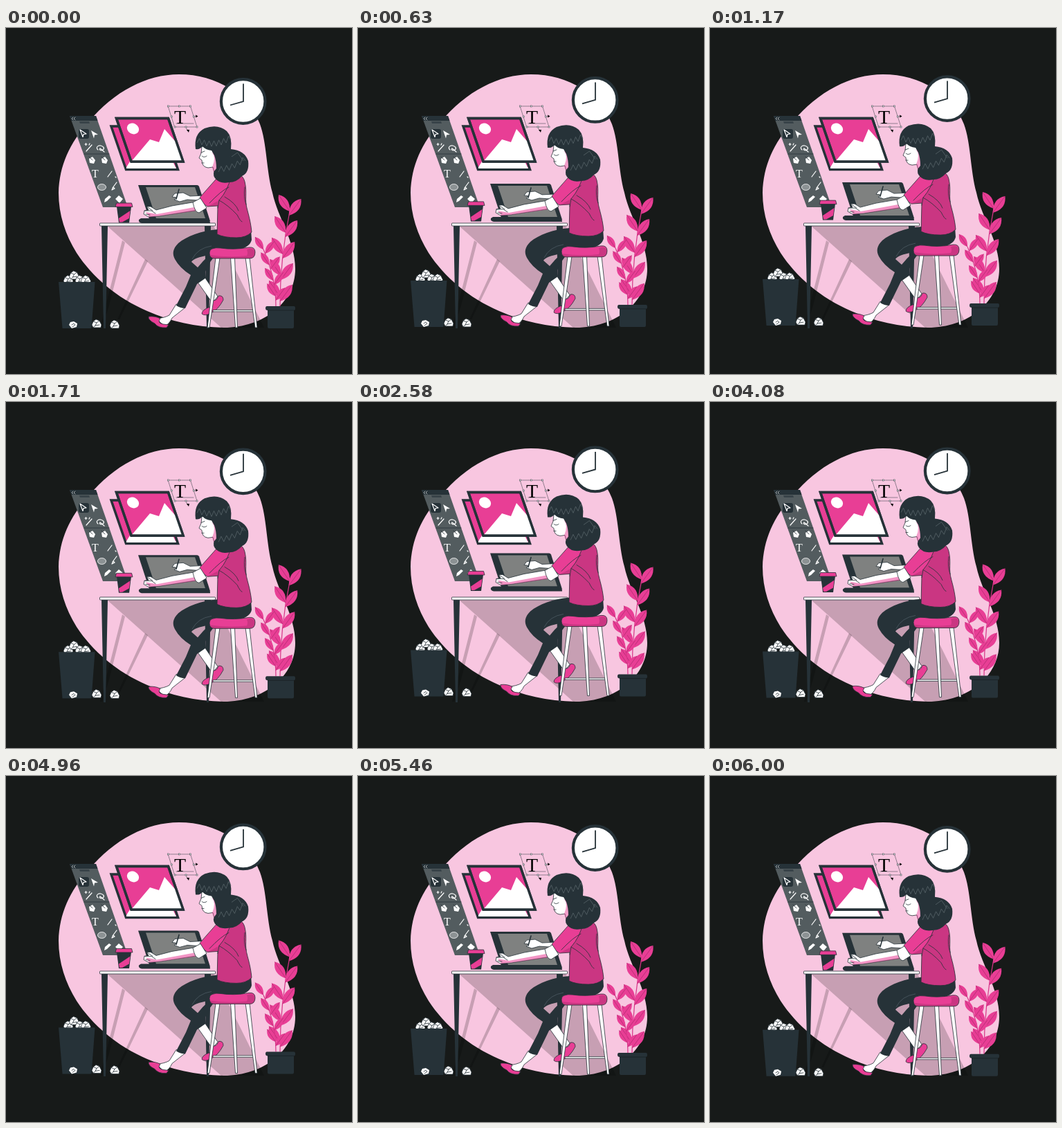
Write an HTML page that moves like this. It is 500 px wide and 500 px high and loops after 6040 ms.

```html
<!DOCTYPE html>
<html lang="en">
<head>
<meta charset="utf-8">
<title>Designer at work</title>
<style>
  html, body { margin: 0; width: 100%; height: 100%; overflow: hidden; background: #171a19; }
  svg { display: block; width: 100vw; height: 100vh; }
  .ink { fill: #263238; }
  .pink { fill: #e83e95; }
  .white { fill: #fff; }
  .line { fill: none; stroke: #263238; stroke-width: .8; stroke-linecap: round; stroke-linejoin: round; }
  .edge { stroke: #263238; stroke-width: .8; stroke-linejoin: round; }
  .icon { fill: none; stroke: #fff; stroke-width: 1.2; stroke-linecap: round; stroke-linejoin: round; }
  .wave { fill: none; stroke: #59656a; stroke-width: .8; stroke-linejoin: round; }
  .shade { fill: #000; opacity: .2; }
  .soft { opacity: .13; }
  text { font-family: "Liberation Serif", "Noto Serif", serif; }
</style>
</head>
<body>
<svg viewBox="0 0 500 500">
  <defs>
    <g id="paper">
      <path class="white edge" d="M-7 2L-5-3-1-6 4-4 7 2 6 6-5 6Z"/>
      <path class="line" d="M-5-3L0-1 4-4M0-1L-2 3-5 6M-2 3L4 2"/>
    </g>
    <g id="nib">
      <path class="white" d="M-4-2L1-5 5 0 3 5-3 4Z"/>
      <path class="line" d="M-4-5L1 0"/>
    </g>
    <path id="frame" d="M159.500 130.500H234.500L256 193H181Z"/>
  </defs>

  <path fill="#f8c6e0" d="M250 67C305 67 351 97 367 139C377 166 376 205 385 238C393 275 418 308 418 348C418 397 372 433 315 433C273 432 238 424 204 409C160 390 125 360 102 325C86 299 76 270 76 238C77 199 92 166 120 135C156 92 203 67 250 67Z"/>
  <path class="shade" d="M146 286H300L373 433H311Z"/>
  <path class="shade" d="M168 307L172 310 149 401 139 433H136ZM201 334L205 337 164 421H161Z"/>

  <!-- tool panel -->
  <path fill="#535c5f" d="M92 127H130L176 259H140Z"/>
  <path class="ink" d="M92 127H130L132.500 134H94.500Z"/>
  <path class="icon" style="stroke-width:.6" d="M97 129l-2 2 2 2M100 129l-2 2 2 2"/>
  <path fill="#384349" d="M106 135H120L121 138H107Z"/>
  <rect class="ink" x="105" y="146" width="15" height="14" rx="3"/>
  <path class="line" d="M113 182H149"/>
  <path class="icon" d="M107 147l9 6-4 .5-1 4z"/>
  <path class="white" d="M123 148l10 6-5 .5-1 5z"/>
  <path class="icon" d="M116 178l8-9M114 168h3M115.500 166.500v3M120 169l1-2"/>
  <path class="icon" d="M133 176c-4-3 0-7 4-6s6 4 3 6-6 0-4-2l6 5"/>
  <use href="#nib" x="124" y="191"/><use href="#nib" x="142" y="191"/>
  <text x="124" y="216" font-size="16" fill="#fff">T</text>
  <path class="icon" d="M147 215l6-8M158 215l1 1M154 231l6-8M153 234l2-4 2 2z"/>
  <ellipse cx="138.500" cy="230" rx="6" ry="4.500" fill="#8c9294" stroke="#fff" stroke-width=".8"/>
  <path class="white" d="M142 252l1-5 6-5 3 2-6 6zM158 247l5-5 6 5-5 6z"/>

  <!-- pictures -->
  <g stroke="#263238" stroke-width="3.500">
    <use href="#frame" x="-7.500" y="11.500" class="pink"/>
    <path class="white" stroke="none" d="M174 201L179 193H241L246 203H174Z"/>
    <use href="#frame" class="pink"/>
    <path class="white" stroke="none" d="M181 193L208 161 221 165 229 146 243 162 248 167 256 193Z"/>
    <ellipse class="white" stroke="none" cx="183.500" cy="145.500" rx="9" ry="7.500" transform="rotate(30 183.500 145.500)"/>
    <use href="#frame" fill="none"/>
  </g>

  <!-- type frame -->
  <path class="line" style="stroke-width:.5" d="M234.500 113H266.500L276 143H244ZM246 138H271M271 128H275M260 143L262 148"/>
  <text x="243" y="137.500" font-size="28">T</text>
  <g id="handles"></g>
  <path d="M274 125.500l3.500 2-3 2zM261 147l4 0-1 4z"/>

  <!-- desk -->
  <path class="ink" d="M138 286H147L144 434H141ZM287 286H296L293 434H290Z"/>
  <rect class="white edge" x="135.500" y="282" width="167" height="4" rx=".6"/>

  <g id="float">
    <!-- clock -->
    <circle cx="342.700" cy="106" r="31.800" fill="#fff" stroke="#263238" stroke-width="4.200"/>
    <path fill="none" stroke="#263238" stroke-width="1.800" d="M343 80.500V106L324 111.500"/>

    <!-- bin -->
    <g id="papers"></g>
    <path class="ink" d="M76 367H128.500L123.500 434H81.500Z"/>
    <use href="#paper" x="131" y="427"/><use href="#paper" x="157" y="428"/>
    <path class="white" d="M91 429l2-4 5-1 5 3-1 5-7 2z"/>
    <path class="line" d="M95 429l3-2 2 2-4 3"/>

    <!-- cup -->
    <path class="ink" d="M160 258H181L178 281.500H163Z"/>
    <path class="pink" d="M163 275L179.500 264 178 275 168 280.500H164Z"/>
    <path class="pink edge" d="M158 258.500L159.500 253H181.500L183 258.500Z"/>

    <!-- tablet -->
    <path class="ink" d="M191 227H276Q278 227 279 229L295 279H208Z"/>
    <path fill="#7f8180" d="M202 230H273L288 275H217Z"/>
    <path class="ink" d="M195 275H290Q295 276 295 282H196Q191 281 192 277Z"/>

    <!-- plant -->
    <g id="plant"></g>
    <path class="ink" d="M377 402H416Q418 402 418 405T416 408V432Q416 434 414 434H380Q378 434 378 432V408Q375 408 375 405T377 402Z"/>
    <path d="M378 408H416" stroke="#1b2428"/>

    <!-- far foot -->
    <path class="white edge" d="M276 366L298 397 306 388 287 360Z"/>
    <path class="pink edge" d="M283 413Q283 407 295 403Q299 399 298 393Q304 396 307 387Q314 386 314 393Q306 408 296 412Q287 417 283 413Z"/>

    <g id="stool"></g>

    <!-- near foot -->
    <path class="white edge" d="M246 399L236 415Q229 419 217 420L229 431Q236 428 240 419L259 404Z"/>
    <path class="pink edge" d="M206 417Q216 416 223 420Q218 426 227 428L235 429 232 433Q220 434 215 427Q205 422 206 417Z"/>

    <!-- legs -->
    <path class="ink" fill-rule="evenodd" d="M306 291C282 293 261 301 249 311C241 319 240 326 244 334Q251 347 267 357L260 374 246 401Q252 405 259 405L276 370 289 361 288 352Q294 337 305 326L337 320Q353 316 355 306L354 291ZM268 338Q271 332 294 328Q284 337 277 346Z"/>
    <path fill="none" stroke="#526069" stroke-width=".7" d="M297 315Q277 318 269 334"/>

    <!-- seat -->
    <path class="pink edge" d="M298 319Q303 317 310 318Q330 321 351 317Q360 316 360 324Q360 333 352 333H301Q294 333 294 325Q294 320 298 319Z"/>
    <path class="shade soft" d="M295 328Q320 332 348 329Q350 325 348 320Q359 316 360 325Q359 333 352 333H301Q296 333 295 328Z"/>

    <!-- far arm -->
    <path class="white edge" d="M287 242L266 243 256 238 244 239 240 244 247 245 243 248 251 251 262 248 277 249Z"/>
    <path fill="none" stroke="#263238" stroke-width="1.600" stroke-linecap="round" d="M250 233L246 247"/>

    <!-- torso -->
    <path class="pink edge" d="M316 209Q341 206 345 222C349 239 344 247 349 264Q354 282 355 295Q347 303 333 303Q315 303 305 298L306 257 291 258Q283 253 280 245L303 219Q308 211 316 209Z"/>
    <path class="shade soft" d="M325 214Q341 206 345 222C349 239 344 247 349 264Q354 282 355 295Q347 303 333 303Q315 303 305 298L306 257 291 258 308 249Q321 234 325 214Z"/>
    <path class="line" d="M325 215Q321 234 308 249L306 260M322 230Q311 235 294 253M308 249Q321 256 334 270Q339 280 341 280M316 244Q332 253 336 264M345 230Q343 245 347 255"/>

    <!-- near arm -->
    <path class="white edge" d="M281 250L240 257 217 263 209 258 203 258 206 263 200 264 199 269 206 273 221 272 278 263Z"/>
    <path class="pink" opacity=".55" d="M202 266L218 269 272 259 276 264 220 272 207 273Z"/>
    <path class="line" d="M200 264L210 264 216 268M203 258L212 264M202 269L208 270"/>
    <path class="white edge" d="M270 252L281 246 290 260 279 267Q273 267 270 252Z"/>

    <!-- head -->
    <path class="white edge" d="M283 171L282 181 279 188 283 191Q283 201 292 202L299 201 301 209 308 208 309 174Z"/>
    <path class="pink" opacity=".5" d="M298 180Q304 187 298 201L301 209 307 208 307 180Z"/>
    <path class="line" d="M283 185Q286 188 290 185M282 180L287 178M283 195L286 195"/>
    <path class="ink" d="M274 175Q271 153 287 145Q306 138 319 149Q327 157 325 175Q345 177 350 192Q352 209 341 214Q333 223 323 223Q309 226 302 217Q297 210 304 203Q304 192 301 184L297 177Q288 176 284 171Q280 176 274 175Z"/>
    <g id="waves"></g>
  </g>
</svg>
<script>
  const $ = id => document.getElementById(id);
  const PERIOD = 6040, RISE = 10;
  const repeat = (n, make) => Array.from({ length: n }, (_, i) => make(i)).join('');

  function leaf(x, y, dx, dy) {
    const bend = s => `${dx * .55 - dy * .42 * s} ${dy * .55 + dx * .42 * s}`;
    return `<g transform="translate(${x} ${y})">
      <path class="pink" d="M0 0Q${bend(1)} ${dx} ${dy}Q${bend(-1)} 0 0"/>
      <path d="M0 0L${dx} ${dy}" stroke="#9f2865" stroke-width=".6"/></g>`;
  }

  // A leaning stem with a pair of leaves at each evenly spaced node.
  function branch(top, foot, lean, nodes, step, size) {
    const x = y => foot + lean * ((402 - y) / (402 - top)) ** 2;
    const mid = (top + 402) / 2;
    return `<path d="M${foot} 402Q${foot} ${mid} ${x(top)} ${top}" fill="none" stroke="#d73387" stroke-width="1.2"/>` +
      repeat(nodes, i => {
        const y = top + step * i;
        return leaf(x(y), y, -size, -size * 1.5) + leaf(x(y + 6), y + 6, size * 1.1, -size * 1.5);
      });
  }

  function zigzag(x0, y0, x1, y1, sag, teeth) {
    const points = Array.from({ length: teeth + 1 }, (_, i) => {
      const u = i / teeth;
      const y = y0 + (y1 - y0) * u + sag * 4 * u * (1 - u) + (i % 2 ? -4 : 4);
      return [x0 + (x1 - x0) * u, y];
    });
    return `<polyline class="wave" points="${points.join(' ')}"/>`;
  }

  $('plant').innerHTML =
    branch(265, 396, 14, 5, 31, 16) + branch(320, 390, -18, 4, 22.5, 12);

  $('waves').innerHTML =
    zigzag(276, 162, 325, 158, 7, 14) + zigzag(307, 204, 346, 188, 4, 10) + zigzag(326, 182, 343, 188, -1, 2);

  $('papers').innerHTML = repeat(4, i =>
    `<use href="#paper" x="${90 + 8.5 * i}" y="${i === 1 ? 357 : 363.5}"/>`);

  $('handles').innerHTML = repeat(9, i => {
    const u = i % 3 / 2, v = Math.floor(i / 3) / 2;
    if (i === 4) return '';
    return `<rect x="${233.5 + 32 * u + 9.5 * v}" y="${112 + 30 * v}" width="2" height="2"
      fill="#fff" stroke="#263238" stroke-width=".5"/>`;
  });

  $('stool').innerHTML =
    '<rect class="white edge" x="299" y="407.5" width="60" height="2.4"/>' +
    repeat(3, i => {
      const top = 306 + 21.5 * i, foot = 292.5 + 34.5 * i + (i === 1 ? 6 : 0);
      return `<path class="white edge" d="M${top - 3} 332H${top + 3}L${foot + 1.5} 433H${foot - 1.5}Z"/>`;
    });

  function draw(now) {
    const phase = now % PERIOD / PERIOD;
    const lift = RISE * (1 - Math.abs(1 - 2 * phase));
    $('float').setAttribute('transform', `translate(0 ${-lift})`);
    requestAnimationFrame(draw);
  }
  requestAnimationFrame(draw);
</script>
</body>
</html>
```
